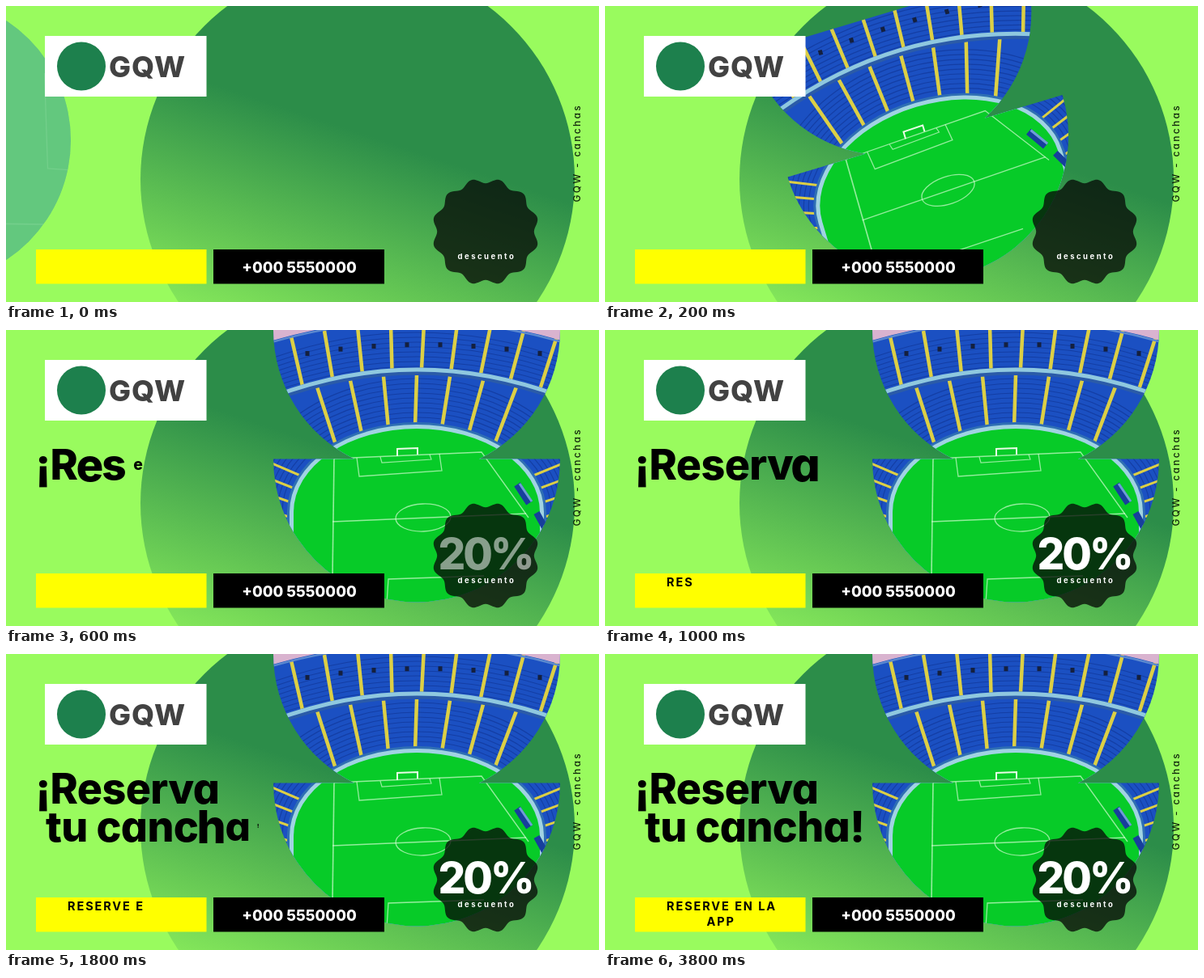
An HTML page with a canvas for the animation above (5000 ms loop, 732 by 366 pixels).

```html
<!DOCTYPE html>
<html lang="es">
<head>
<meta charset="utf-8">
<title>Reserva tu cancha</title>
<style>
  html, body { margin: 0; width: 100%; height: 100%; overflow: hidden; background: #99fb5e; }
  canvas, svg { position: absolute; left: 0; top: 0; width: 732px; height: 366px; display: block; }
  text { font-family: Inter, "Open Sans", sans-serif; font-feature-settings: "cv11"; white-space: pre; }
  .head { font-size: 52px; font-weight: 800; letter-spacing: -0.6px; }
  .cta { font-size: 14.5px; font-weight: 700; letter-spacing: 1.9px; }
  .phone { font-size: 18.5px; font-weight: 800; fill: #fff; text-anchor: middle; }
  .offer { font-size: 53px; font-weight: 800; letter-spacing: -3px; fill: #fff; text-anchor: middle; }
  .small { font-size: 9.5px; font-weight: 700; letter-spacing: 2.5px; fill: #fff; }
  .side { font-size: 12px; font-weight: 500; letter-spacing: 2.3px; fill: #10260c; }
  .brand { font-size: 36px; font-weight: 800; letter-spacing: 1px; fill: #424242; }
</style>
</head>
<body>
<canvas id="stage" width="732" height="366"></canvas>
<svg id="words" viewBox="0 0 732 366">
  <text class="brand" x="127" y="88">GQW</text>
  <text class="side" transform="translate(709 242.5) rotate(-90)">GQW - canchas</text>
  <text class="phone" x="362" y="329.5">+000 5550000</text>
  <text class="small" x="557.5" y="313">descuento</text>
  <text class="offer" id="offer" x="591.5" y="296">20%</text>
  <text class="cta" id="cta1" x="76" y="317"></text>
  <text class="cta" id="cta2" x="125.5" y="336"></text>
</svg>
<script>
const LOOP = 5000, STEP = 100;
const ctx = document.getElementById('stage').getContext('2d');
const byId = id => document.getElementById(id);
const clamp = v => Math.max(0, Math.min(1, v));
const lerp = (a, b, p) => a + (b - a) * p;

function rect(x, y, w, h, color) {
  ctx.fillStyle = color;
  ctx.fillRect(x, y, w, h);
}

function disc(x, y, r, color) {
  ctx.fillStyle = color;
  ctx.beginPath();
  ctx.arc(x, y, r, 0, 7);
  ctx.fill();
}

function line(points, width, color) {
  ctx.strokeStyle = color;
  ctx.lineWidth = width;
  ctx.beginPath();
  for (let i = 0; i < points.length; i += 2) ctx.lineTo(points[i], points[i + 1]);
  ctx.stroke();
}

// Shallow arch across the stands, y being its height at the middle.
function arch(y, sag, width, color) {
  ctx.strokeStyle = color;
  ctx.lineWidth = width;
  ctx.beginPath();
  ctx.moveTo(325, y + sag);
  ctx.quadraticCurveTo(507, y - sag, 690, y + sag);
  ctx.stroke();
}

function bowl(grow) {
  ctx.beginPath();
  ctx.moveTo(507 - 154 - grow, 350);
  ctx.lineTo(507 - 154 - grow, 225);
  ctx.ellipse(507, 225, 154 + grow, 105 + grow, 0, Math.PI, 2 * Math.PI);
  ctx.lineTo(507 + 154 + grow, 350);
}

function stands() {
  rect(320, -20, 375, 365, '#1b50c2');
  const row = 'rgba(8,30,110,.35)';
  for (let i = 0; i < 8; i++) arch(3 + i * 6, 33, 1.2, row);
  ctx.lineWidth = 1.2;
  ctx.strokeStyle = row;
  for (let g = 12; g < 65; g += 6) { bowl(g); ctx.stroke(); }

  const yellow = '#dccf45';
  for (let i = -4; i <= 4; i++) {
    line([516 + 41 * i, -8 + i * i, 513 + 36.5 * i, 48 + 1.6 * i * i], 4.5, yellow);
    line([507 + 41 * i, 56 + 1.6 * i * i, 505 + 33 * i, 119 + 2.2 * i * i], 4.5, yellow);
    const k = i < 0 ? i + .5 : i - .5;
    if (i) rect(513 + 41 * k, 15 + .9 * k * k, 5, 6, '#14203f');
  }
  for (let i = 0; i < 4; i++) {
    const y = 164 + i * 20;
    line([326, y, 368 - i * 4, y + 18 - i * 3], 3, yellow);
    line([690, y, 646 + i * 4, y + 18 - i * 3], 3, yellow);
  }
  arch(-20, 27, 14, '#d9b3cf');
  arch(-11, 27, 2.5, '#5b89cf');
  arch(51, 35, 9, '#2b5ba8');
  arch(49, 35, 5, '#8fc8df');
}

function pitch() {
  bowl(6);
  ctx.fillStyle = '#2f6fb4';
  ctx.fill();
  bowl(3);
  ctx.fillStyle = '#a0d3e2';
  ctx.fill();
  bowl(-2);
  ctx.fillStyle = '#07cb28';
  ctx.fill();

  const chalk = 'rgba(225,255,220,.65)';
  line([405, 159, 587, 151, 645, 232], 1.3, chalk);
  line([405, 159, 403, 305], 1.6, chalk);
  line([433, 158, 436, 181, 538, 174, 535, 153], 1.3, chalk);
  line([462, 157, 464, 164, 525, 160, 523, 154], 1.2, chalk);
  line([470, 338, 472, 308, 590, 304], 1.3, chalk);
  line([403, 237, 642, 227], 1.3, chalk);
  ctx.beginPath();
  ctx.ellipse(515, 232, 34, 17, -.04, 0, 7);
  ctx.stroke();
  line([483, 156, 483, 147, 508, 146, 508, 154], 2, '#e9fbe6');
  line([631, 191, 646, 214], 9, '#173f9c');
  line([634, 190, 649, 212], 3, '#6f9ed6');
  line([655, 226, 666, 246], 8, '#173f9c');
}

// Two half discs, the upper one cut by the lower one's flat edge, roll in from the left.
function photo(t) {
  const p = 1 - Math.pow(1 - clamp(t / 500), 3.3);
  ctx.save();
  ctx.globalAlpha = clamp(.2 + t / 250);
  ctx.translate(lerp(-97, 507, p), lerp(166, 159.5, p));
  ctx.rotate(lerp(-Math.PI / 2, 0, p));
  const cut = Math.acos(159.5 / 177);
  ctx.beginPath();
  ctx.arc(0, -159.5, 177, 0, Math.PI / 2 - cut);
  ctx.arc(0, -159.5, 177, Math.PI / 2 + cut, Math.PI);
  ctx.closePath();
  ctx.moveTo(177, 0);
  ctx.arc(0, 0, 177, 0, Math.PI);
  ctx.closePath();
  ctx.clip();
  ctx.translate(-507, -159.5);
  stands();
  pitch();
  ctx.restore();
}

function badge() {
  ctx.beginPath();
  for (let a = 0; a < 360; a += 2) {
    const q = a * Math.PI / 180, r = 63 - 3.2 * Math.cos(12 * q);
    ctx.lineTo(592 + r * Math.cos(q), 279 + r * Math.sin(q));
  }
  ctx.closePath();
  ctx.fillStyle = 'rgba(6,8,6,.76)';
  ctx.fill();
}

function backdrop() {
  rect(0, 0, 732, 366, '#99fb5e');
  const g = ctx.createLinearGradient(423, 152, 328, 436);
  g.addColorStop(0, '#2c8d49');
  g.addColorStop(1, '#8df05c');
  disc(434, 214.5, 268, g);
}

// Heading letters, laid out once and then popped in one by one.
const words = byId('words');
function addText(content, x, y) {
  const el = document.createElementNS(words.namespaceURI, 'text');
  el.setAttribute('class', 'head');
  el.setAttribute('x', x);
  el.setAttribute('y', y);
  el.textContent = content;
  words.appendChild(el);
  return el;
}

const letters = [];
function layLine(content, x, y, first) {
  const whole = addText(content, x, y);
  const spots = [...content].map((c, i) => [
    whole.getStartPositionOfChar(i).x, whole.getEndPositionOfChar(i).x]);
  whole.remove();
  [...content].forEach((c, i) => {
    if (c === ' ') return;
    const [a, b] = spots[i];
    letters.push({ el: addText(c, a, y), x: (a + b) / 2, y: y - 19, start: 226 + 87 * (first + i) });
  });
}
layLine('¡Reserva', 36.5, 185, 0);
layLine('tu cancha!', 49, 232, 9);

function backOut(u) {
  const v = u - 1;
  return 1 + 2.7 * v * v * v + 1.7 * v * v;
}

function heading(t) {
  for (const { el, x, y, start } of letters) {
    const u = clamp((t - start) / 290);
    const s = u > 0 ? backOut(u) : 0;
    el.setAttribute('visibility', s > 0 ? 'visible' : 'hidden');
    el.setAttribute('transform', `translate(${x} ${y}) scale(${s}) translate(${-x} ${-y})`);
  }
}

const CTA = 'RESERVE EN LA APP', BREAK = 14;
function callToAction(t) {
  const n = Math.max(0, Math.floor((t - 1000) / 133.3 + 3.5));
  byId('cta1').textContent = CTA.slice(0, Math.min(n, BREAK - 1));
  byId('cta2').textContent = CTA.slice(BREAK, Math.max(n, BREAK));
}

function draw(t) {
  backdrop();
  photo(t);
  rect(48, 37, 199.5, 75, '#fff');
  disc(93, 74.5, 30, '#1d804d');
  rect(37, 301, 210.5, 42.5, '#ffff00');
  rect(256, 301, 211, 42.5, '#000');
  badge();
  heading(t);
  callToAction(t);
  byId('offer').setAttribute('opacity', clamp((t - 340) / 500));
}

const begin = performance.now();
function tick() {
  const t = (performance.now() - begin) % LOOP;
  draw(Math.floor(t / STEP) * STEP);
  requestAnimationFrame(tick);
}
tick();
</script>
</body>
</html>
```
